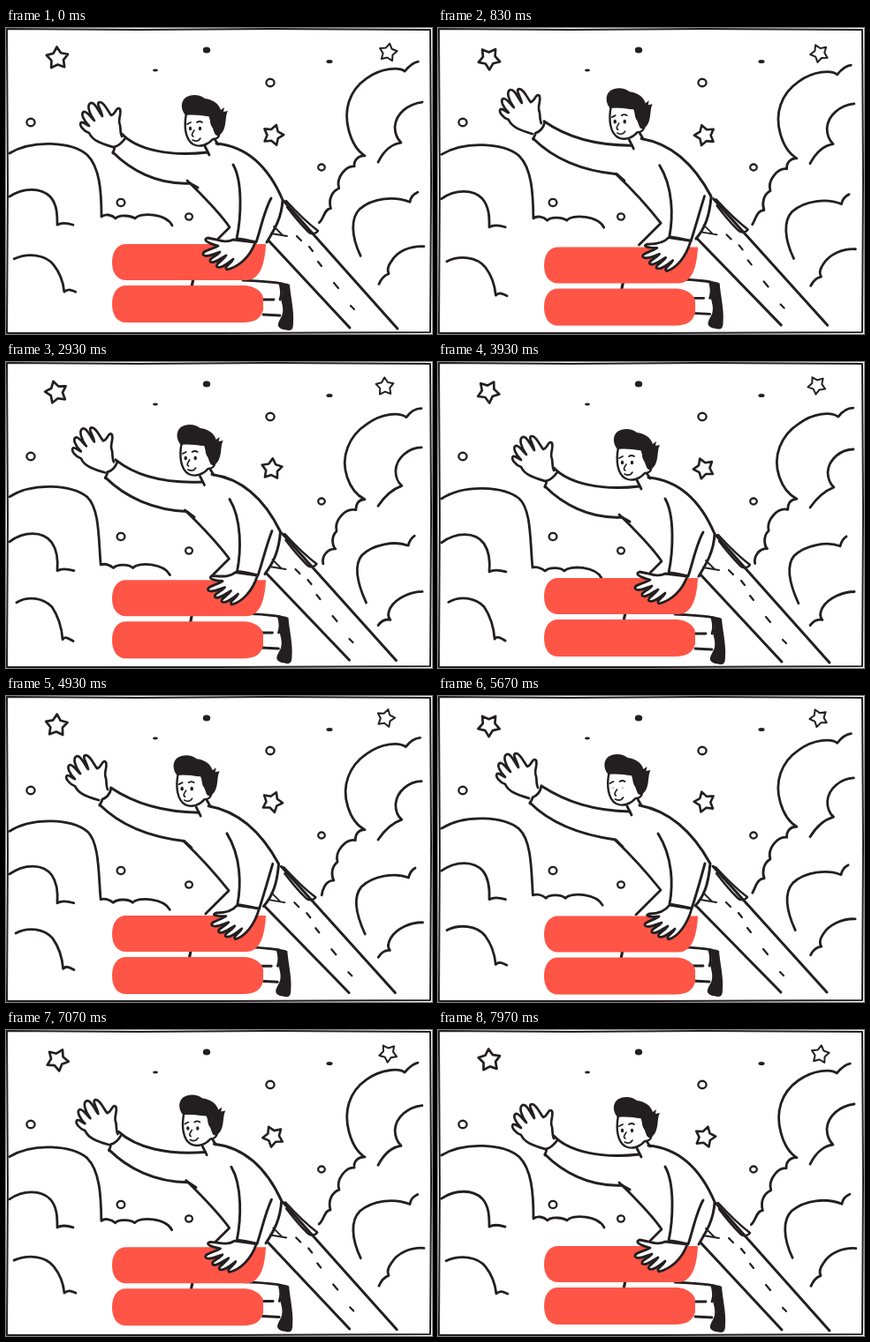
These frames come from a looping animation (482x347 px, 8010 ms). An HTML page with a canvas:

```html
<!DOCTYPE html>
<html>
<head>
<meta charset="utf-8">
<style>
html, body { margin: 0; width: 100%; height: 100%; overflow: hidden; background: #fff; }
canvas { display: block; }
</style>
</head>
<body>
<canvas id="stage" width="482" height="347"></canvas>
<script>
const ctx = document.getElementById('stage').getContext('2d');
const LOOP = 8010, INK = '#231f20', RED = '#ff5546', TAU = Math.PI * 2;

// Blend two paths that share the same commands.
function morph(a, b, u) {
  const ends = b.match(/-?\d+/g);
  let i = 0;
  return a.replace(/-?\d+/g, n => (+n + (ends[i++] - n) * u).toFixed(2));
}
function line(d, width = 2.8, fill) {
  const path = new Path2D(d);
  if (fill) { ctx.fillStyle = fill; ctx.fill(path); }
  ctx.lineWidth = width;
  ctx.stroke(path);
}
function solid(d, color) {
  ctx.fillStyle = color;
  ctx.fill(new Path2D(d));
}
function shifted(x, y, paint) {
  ctx.save();
  ctx.translate(x, y);
  paint();
  ctx.restore();
}
function ellipse(x, y, rx, ry, filled) {
  ctx.beginPath();
  ctx.ellipse(x, y, rx, ry, 0, 0, TAU);
  ctx.lineWidth = 2.3;
  filled ? ctx.fill() : ctx.stroke();
}

// Each cloud: time of its lowest point, upper outline, lower outline.
const clouds = [
  [4000, 'M4 142C30 126 75 129 92 144C106 158 108 185 108 214C112 210 120 212 124 216C128 211 142 213 146 216C152 208 182 211 188 224',
         'M4 155C30 138 75 141 92 155C106 168 104 205 107 233C112 232 117 234 121 237C126 232 139 233 143 237C150 230 178 232 185 245'],
  [3700, 'M4 191C20 180 40 181 50 191C58 200 58 212 58 223C63 220 70 221 76 223',
         'M4 205C20 193 42 192 52 206C58 215 59 228 58 238C63 235 70 236 77 238'],
  [3350, 'M9 261C25 254 45 256 54 268C62 278 65 288 66 298C71 294 74 296 79 298',
         'M12 273C25 265 42 268 52 278C60 290 63 302 64 315C67 311 71 314 76 317'],
  [3300, 'M466 37C461 38 457 41 451 48C445 43 425 44 408 56C388 70 382 92 388 115C392 130 398 139 406 144C399 143 393 149 394 156C385 155 373 169 377 181C369 184 364 193 367 204C360 204 360 216 354 220',
         'M470 53C463 53 458 56 453 63C445 57 425 58 408 71C388 84 378 108 386 131C390 143 398 152 406 156C400 156 396 160 396 168C384 165 371 180 374 192C366 200 371 212 373 212C362 212 357 222 359 229'],
  [3900, 'M471 84C455 86 441 97 440 112C440 120 443 126 447 130C438 131 428 138 421 152',
         'M470 99C456 99 442 110 441 125C441 132 444 139 448 142C438 146 430 152 421 165'],
  [3600, 'M466 186C461 188 458 191 457 197C440 190 415 192 400 205C390 215 390 235 401 258',
         'M462 198C459 200 456 205 455 209C440 203 415 208 403 220C393 232 398 252 408 274'],
  [3450, 'M473 247C458 246 443 252 436 264C430 272 432 276 433 278C428 280 424 285 422 290',
         'M471 261C458 261 442 268 435 279C431 287 433 291 435 293C428 291 424 295 421 299']
];

function drawClouds(t) {
  for (const [low, a, b] of clouds) {
    line(morph(a, b, (1 + Math.cos((t - low) / LOOP * TAU)) / 2));
  }
}

function star(x, y, radius, tilt, drift, width, t) {
  const turn = t / LOOP * TAU;
  ctx.save();
  ctx.translate(x + drift * Math.cos(turn + 0.4), y + drift * Math.sin(turn + 0.4));
  ctx.rotate(turn + tilt);
  ctx.beginPath();
  for (let i = 0; i < 10; i++) {
    const r = i % 2 ? radius * 0.56 : radius;
    ctx.lineTo(r * Math.sin(i * TAU / 10), -r * Math.cos(i * TAU / 10));
  }
  ctx.closePath();
  ctx.lineWidth = width;
  ctx.stroke();
  ctx.restore();
}

function drawSky(t) {
  star(57.5, 34, 12.8, -0.05, 0.7, 2.7, t);
  star(430.5, 27, 10.4, 0.17, 2, 2, t);
  star(301.5, 121, 12, 0.3, 0.8, 2.6, t);
  for (const [x, y, r] of [[28, 107, 4.6], [299, 62, 4.6], [130, 198, 4.4], [207, 214, 3.9], [357, 158, 3.8]]) ellipse(x, y, r, r * 0.92);
  ctx.fillStyle = INK;
  ellipse(227, 25, 4.2, 3.6, true);
  ellipse(169, 48, 3, 1.4, true);
  ellipse(366, 38, 3.6, 2.1, true);
}

function drawHead(blink) {
  line('M204 97C201 112 203 127 212 132C220 136 229 132 234 126C244 126 243 113 236 116L230 98Z', 2.4, '#fff');
  solid('M203 99C198 93 197 84 203 79C209 75 219 75 225 80C234 81 241 86 243 93L247 90L246 95L251 94C247 101 251 115 241 122C237 123 235 119 235 114C230 110 231 104 231 100C224 101 213 96 203 99Z', INK);
  ctx.fillStyle = INK;
  ellipse(208.5, 114, 1.7, blink ? 0.3 : 2.3, true);
  ellipse(219.5, 114, 1.7, blink ? 0.3 : 2.3, true);
  line('M205 109L209 107M216 107Q219 105 222 107', 1.8);
  line('M213 116C211 119 209 122 212 123M211 127Q217 130 220 125', 1.6);
}

function drawMan(u, blink) {
  const m = (a, b) => morph(a, b, u);

  // far leg
  line(m('M314 196L443 341M297 241L389 340', 'M311 193L440 336M293 239L388 336'), 3);
  shifted(-3 * u, -2 * u, () => {
    line('M317 196C328 208 341 221 353 230C350 234 345 234 342 231C333 222 324 211 318 203', 2.5);
    line('M303 225L313 235M300 233L318 236', 1.8);
    line('M329 236L334 241M343 248L347 253M353 265L357 270M371 289L376 295M390 315L394 319', 2.2);
  });

  // near leg and shoe
  shifted(-3 * u, -2 * u, () => {
    line('M268 286C285 287 300 287 312 290M291 325L310 326M310 290Q313 300 310 308M290 308L303 308');
    solid('M309 288C313 289 317 289 321 291C322 305 326 320 325 334C325 340 324 343 320 343C315 342 310 342 308 338C307 333 312 329 313 323C314 317 312 312 311 307C314 301 312 294 309 288Z', INK);
  });
  line(m('M212 284L210 294', 'M209 288L207 298'), 3.2);

  // body
  line(m('M205 173C222 190 240 207 253 226L240 239', 'M200 163C218 180 236 200 252 220L224 248'));
  line(m('M238 131C270 134 296 155 313 195C312 215 304 228 295 243', 'M228 124C260 130 287 152 308 190C306 212 302 226 291 238'), 3);

  shifted(0, 4.5 * u, () => {
    solid('M136 245H294C293 268 287 286 272 286H136C126 286 120 278 120 266C120 253 126 245 136 245Z', RED);
    solid('M136 292H268C282 292 291 300 291 307V320C288 329 282 334 268 334H136C126 334 120 326 120 313C120 300 126 292 136 292Z', RED);
  });

  // lowered arm
  line(m('M257 240C248 245 238 239 228 238C222 240 228 244 240 247C232 252 222 252 223 257C226 261 236 256 242 254C237 260 229 261 231 265C235 268 243 261 249 258C245 264 236 268 239 271C244 273 252 266 257 262C254 268 246 271 250 274C263 271 276 260 282 243Z',
         'M262 237C257 244 249 247 239 247C233 249 239 251 250 250C243 255 233 256 234 260C237 264 247 259 253 257C248 263 240 264 242 268C246 271 254 264 260 261C256 267 247 270 250 273C255 275 263 268 268 264C265 270 257 273 261 276C271 273 282 260 287 241Z'), 2.8, '#fff');
  line(m('M257 155C268 174 266 215 261 239C267 239 275 241 283 243C288 229 292 207 300 193', 'M249 156C266 183 266 215 262 236C268 237 280 239 287 241C292 226 296 212 302 190'), 2.9);

  // raised arm
  line(m('M131 120C148 138 185 146 228 141', 'M117 102C145 120 175 130 217 131'), 3);
  line(m('M121 141C140 160 170 178 208 176L217 181', 'M104 121C130 147 165 158 201 163L209 171'), 3);
  shifted(-18 * u, -19 * u, () => line('M121 135C108 131 98 128 94 119C88 117 82 110 85 107C87 106 91 110 94 111C88 105 84 97 88 95C92 94 97 103 100 105C94 97 91 87 96 85C101 84 106 97 109 100C108 93 101 85 106 84C111 84 115 94 119 99C124 98 125 88 129 92C131 98 126 104 129 110C130 116 129 119 131 123', 2.7, '#fff'));
  line(m('M121 142C121 139 124 137 122 135C128 134 132 129 135 125', 'M104 122C104 120 107 118 107 115C112 113 116 108 117 102'));

  // neck and head
  line(m('M225 134L230 144M236 126L240 132', 'M214 125L219 135M226 117L230 124'));
  shifted(-10.5 * u, -10 * u, () => drawHead(blink));
}

const clamp = x => Math.min(1, Math.max(0, x));
const ease = x => x < 0.5 ? 4 * x ** 3 : 1 - 4 * (1 - x) ** 3;

function frame(now) {
  const t = now % LOOP, beat = t % (LOOP / 2);
  const lift = ease(clamp(beat / 1333)) - ease(clamp((beat - 2266) / 1333));
  ctx.fillStyle = '#fff';
  ctx.fillRect(0, 0, 482, 347);
  ctx.strokeStyle = INK;
  ctx.lineCap = ctx.lineJoin = 'round';
  drawClouds(t);
  drawSky(t);
  drawMan(lift, beat > 1660 && beat < 1800);
  line('M1 1L150 2L300 1L480 2L481 170L480 345L240 346L1 346L2 180Z', 2);
  requestAnimationFrame(frame);
}
requestAnimationFrame(frame);
</script>
</body>
</html>
```
